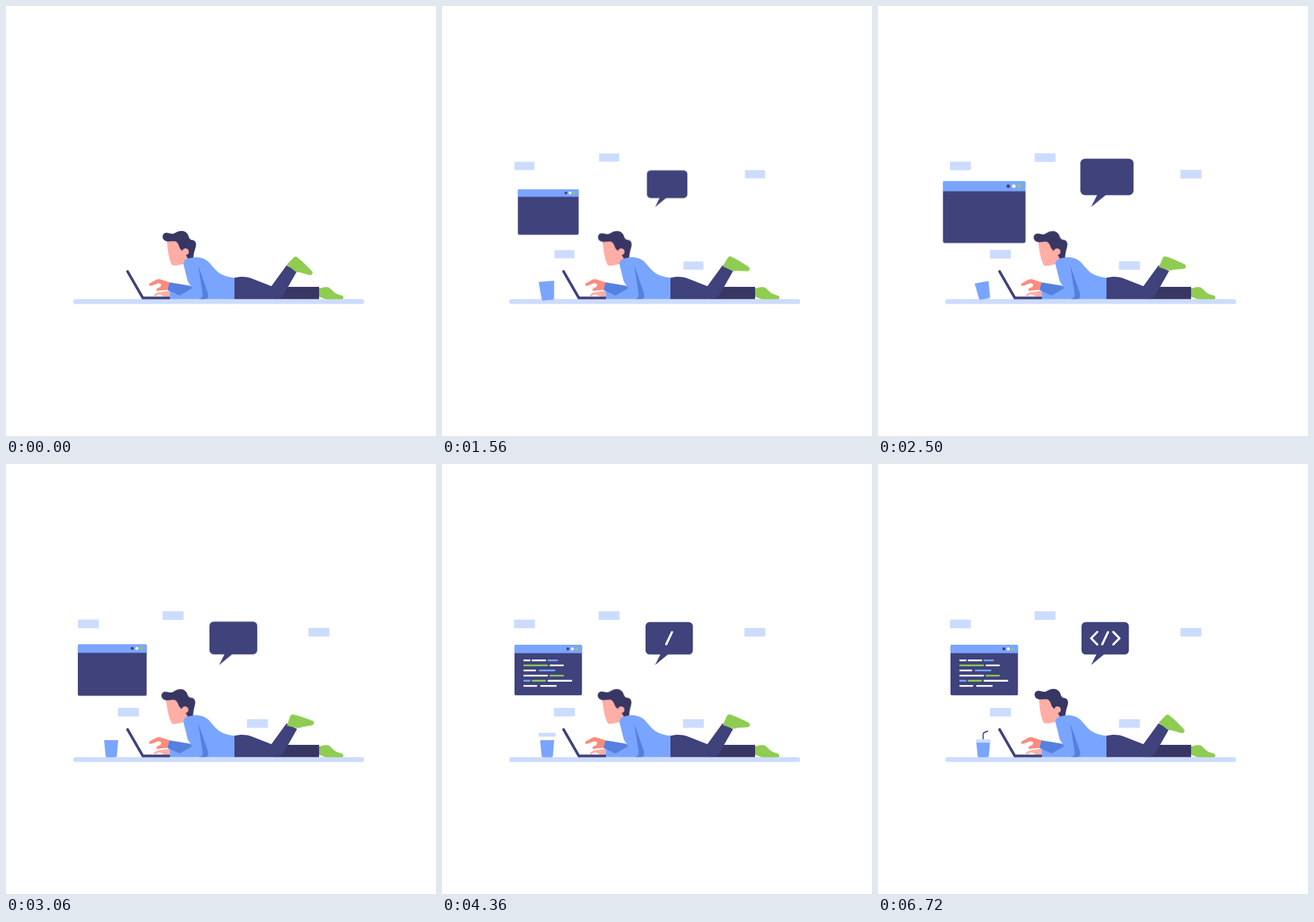
Animation of 640 by 640 pixels, one loop 9.04 s. Source, as an HTML page without scripts:

```html
<!DOCTYPE html>
<html lang="en">
<head>
<meta charset="utf-8">
<title>Working on a laptop</title>
<style>
  html, body { margin: 0; width: 100%; height: 100%; overflow: hidden; background: #fff; }
  svg { display: block; width: 100%; height: 100%; }

  .pale { fill: #ccdcff; }
  .blue { fill: #7aa5ff; }
  .shade { fill: #5580e0; }
  .navy { fill: #3f427b; }
  .dark { fill: #383763; }
  .green { fill: #8fcc52; }
  .skin { fill: #ffaea6; }
  .hand { fill: #fc8c7c; }
  .white { fill: #fff; }
  .line { fill: none; stroke-linecap: round; stroke-linejoin: round; }

  .blocks rect, .head, .foot, .cup, .lid, .straw, .window, .bubble, .code, .slash, .lt, .gt {
    animation: 9.04s linear infinite;
  }

  .blocks rect { transform-box: fill-box; transform-origin: center; animation-name: block; }
  @keyframes block {
    0%, 1.2% { transform: scale(0); animation-timing-function: cubic-bezier(.1, .6, .4, 1); }
    24.8%, 100% { transform: scale(1); }
  }

  .head { transform-origin: 268px 380px; animation-name: nod; }
  @keyframes nod {
    0%, 74.34%, 100% { transform: rotate(0deg); }
    37.17% { transform: rotate(-3deg); }
  }

  .foot { transform-origin: 428px 386.5px; animation-name: swing; }
  @keyframes swing {
    0%, 74.34%, 100% { transform: rotate(0deg); }
    37.17% { transform: rotate(-28deg); }
  }

  .cup { transform-origin: 156.6px 423.7px; animation-name: tumble; }
  @keyframes tumble {
    0%, 1.33% { transform: rotate(0deg) scale(0); animation-timing-function: cubic-bezier(.2, .5, .5, 1); }
    12.2% { transform: rotate(22.5deg) scale(1.24); animation-timing-function: ease-in-out; }
    21.6% { transform: rotate(-25.5deg) scale(1); animation-timing-function: ease-in-out; }
    32.5%, 100% { transform: rotate(0deg) scale(1); }
  }

  .window { transform-origin: 158.2px 306.6px; animation-name: window; }
  @keyframes window {
    0%, 13.7% { transform: scale(0); animation-timing-function: cubic-bezier(.2, .6, .35, 1); }
    25.5% { transform: scale(1.31); animation-timing-function: cubic-bezier(.25, 0, .05, 1); }
    38.7%, 100% { transform: scale(1); }
  }

  .bubble { transform-origin: 317px 299.3px; animation-name: bubble; }
  @keyframes bubble {
    0%, 13.7% { transform: scale(0); animation-timing-function: cubic-bezier(.2, .6, .35, 1); }
    25% { transform: scale(1.21); animation-timing-function: cubic-bezier(.25, 0, .05, 1); }
    38%, 100% { transform: scale(1); }
  }

  .code { transform-origin: 121px 311px; animation-name: code; }
  @keyframes code {
    0%, 38.5% { transform: scaleX(0); animation-timing-function: ease-out; }
    47.5%, 100% { transform: scaleX(1); }
  }

  .slash { transform-origin: 338px 259.3px; animation-name: slash; }
  @keyframes slash {
    0%, 38.5% { transform: scale(0); animation-timing-function: ease-out; }
    48.2%, 100% { transform: scale(1); }
  }

  .lt { --from: 16px; transform-origin: 321.5px 259.3px; animation-name: bracket; }
  .gt { --from: -16px; transform-origin: 355px 259.3px; animation-name: bracket; }
  @keyframes bracket {
    0%, 50.2% { transform: translateX(var(--from)) scale(0); animation-timing-function: cubic-bezier(.1, .5, .45, 1); }
    61.9%, 100% { transform: none; }
  }

  .lid { transform-origin: 156.7px 412.2px; animation-name: lid; }
  @keyframes lid {
    0%, 39% { transform: translateY(-2px) scale(0); animation-timing-function: ease-out; }
    48.23% { transform: translateY(-9.4px) scale(1.18); animation-timing-function: ease-out; }
    51.3% { transform: translateY(-11px) scale(1.45); animation-timing-function: cubic-bezier(.35, 0, .2, 1); }
    60%, 100% { transform: none; }
  }

  .straw { animation-name: drop; }
  @keyframes drop {
    0%, 62.6% { opacity: 0; transform: translateY(-121px); }
    62.61% { opacity: 1; transform: translateY(-121px); animation-timing-function: cubic-bezier(.3, .2, .3, 1); }
    74.2%, 100% { opacity: 1; transform: none; }
  }
</style>
</head>
<body>
<svg viewBox="0 0 640 640">
  <g class="blocks pale">
    <rect x="107.1" y="231.6" width="31.2" height="12.8"/>
    <rect x="233.1" y="219.2" width="31.2" height="12.8"/>
    <rect x="450.2" y="244" width="31.2" height="12.8"/>
    <rect x="166.6" y="363" width="31.2" height="12.8"/>
    <rect x="358.6" y="379.8" width="31.2" height="12.8"/>
  </g>

  <rect class="pale" x="100" y="436.3" width="433" height="7.3" rx="3.6"/>

  <g class="window">
    <rect class="navy" x="107.9" y="269" width="100.4" height="75.3" rx="2.6"/>
    <path class="blue" d="M107.9 281.4V271.6Q107.9 269 110.5 269H205.7Q208.3 269 208.3 271.6V281.4Z"/>
    <circle class="navy" cx="187.3" cy="275.2" r="2.2"/>
    <circle class="white" cx="194" cy="275.2" r="2.2"/>
    <circle class="green" cx="200.7" cy="275.2" r="2.2"/>
    <g class="code line" stroke-width="2.6">
      <path stroke="#fff" d="M122.3 292.2h8.2M134.8 292.2h19M161.3 299.8h18.8M122.3 307.3h16.6M122.3 315h34.2M158.3 322.6h34.2M122.3 330.2h18.2M147.3 330.2h22.2"/>
      <path stroke="#7aa5ff" d="M158.3 292.2h13.2M145.3 307.3h22.2M122.3 322.6h8.2"/>
      <path stroke="#8fcc52" d="M122.3 299.8h34.2M161.3 315h18.8M134.8 322.6h18.8"/>
    </g>
  </g>

  <g class="bubble">
    <rect class="navy" x="302.9" y="235.2" width="70.5" height="48.3" rx="6.3"/>
    <path class="navy" d="M325.5 282.5L317 299.3L337.5 282.5Z"/>
  </g>
  <g class="line" stroke="#fff" stroke-width="3.2">
    <path class="slash" d="M342.3 250.3L333.8 268.3"/>
    <path class="lt" d="M326.3 250L317.2 259.3L326.3 268.6"/>
    <path class="gt" d="M350.2 250L359.4 259.3L350.2 268.6"/>
  </g>

  <path class="straw line" stroke="#3f427b" stroke-width="1.7" d="M156.5 410V402.2Q156.5 400.2 158.3 399.6L163.2 397.6"/>
  <path class="cup blue" d="M146 411H167L165.1 434Q164.8 436.5 162.4 436.5H150.8Q148.5 436.5 148.2 434Z"/>
  <rect class="lid pale" x="146" y="409.8" width="21.4" height="4.9" rx=".8"/>

  <path class="dark" d="M400 418H466V436.3H400Z"/>
  <path class="green" d="M466 420.2C471 419.6 476 417 481 419.2C486 423 488 428 498.500 430.500Q502.200 431.600 502.200 434Q502.200 436.500 499 436.500H478C473 436.300 470 434 466 432.500Z"/>
  <path class="navy" d="M339.500 404.700C349 402 357 402.500 365 405.300L395 417L417.500 386L433.200 394.500L413 430Q408.500 436.300 400 436.300H339.500Z"/>
  <path class="foot green" d="M417.800 385L429 373.600Q431 372.200 433 373.600C440 379 449 388 455.300 394.800Q457.300 396.800 455.500 399.200Q454 401.200 450.500 400.300C444 398.500 438 396 431.500 395.800Z"/>

  <g class="head">
    <path class="skin" d="M239.500 349H255L264 364L272 372V384L263.500 384C257 386 250 386.600 247 385.700C241.500 376 240.500 360 239.500 349Z"/>
    <path class="dark" d="M238 337.500C243 337 246 341 252 337.500C258 333.500 267 333 271 340.500C272 344 273 347.600 277 348.300C283 349.300 283.800 354 282 360C280 366 279 371 278.500 377.500H271.500L267.800 370.500L262 364C256.500 361 258 351 251 350L241 350.500C231 350 231 338.500 238 337.500Z"/>
    <circle class="skin" cx="267.200" cy="365.700" r="4.900"/>
  </g>

  <path class="skin" d="M245 423.500L232 425.500Q226 425.500 221.500 428.800Q219 431 221.500 432.200L225.500 430Q229 428 232 430.800L235 432.600H245Z"/>
  <path class="blue" d="M264.300 385C263.500 379.500 268 376.500 272 375.600C283 372.700 294 373.500 302 381.500C309 389 313 396 322 400C328 402.600 334 403.800 340 404.600V436.300H244V423L261 429L275 417L270.500 410Z"/>
  <path class="shade" d="M286 385.800L299.400 424Q302.200 432 300 434.800Q298.800 436.300 296 436.300H287.500Q293.300 435 292.600 428Z"/>
  <path class="shade" d="M243 411.300L273.500 416.200L277.400 419.800L258.500 431L240 422.600Z"/>
  <path class="hand" d="M243.500 411.300L228.500 406.500Q226 406 223 407.800L214 412.800Q212 414.800 213.800 416.300Q216 417.200 219 415.600L226 412.800Q229 412.600 231 414.300L230 418L225.500 420Q223 421.500 224 423.200Q225.500 424.600 229 423.400L240 422.600Z"/>

  <path class="line" stroke="#3f427b" stroke-width="4" d="M181 395.200L203.500 434.300"/>
  <path class="navy" d="M202 432.400H244V436.400H203Z"/>
</svg>
</body>
</html>
```
